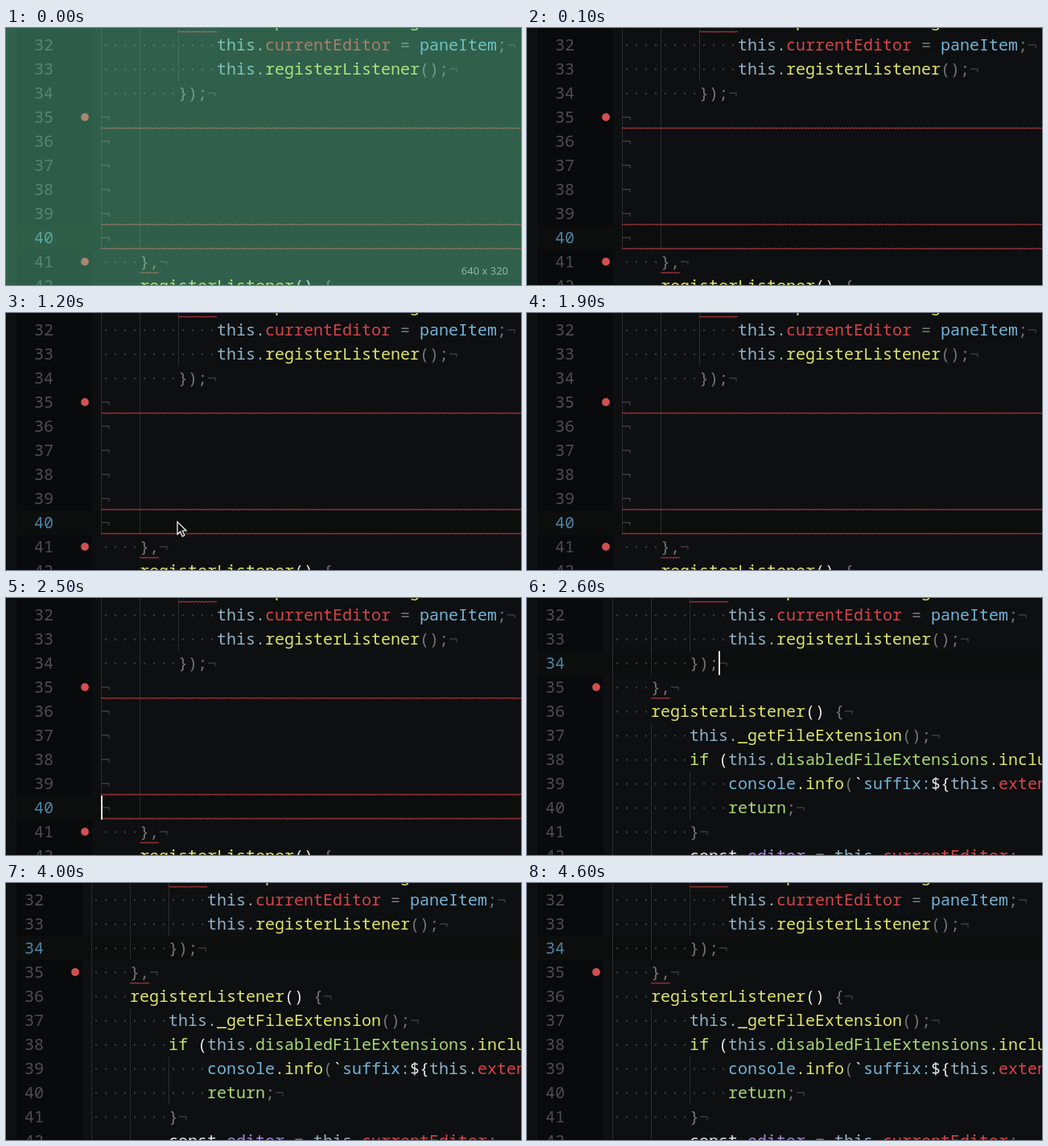
An HTML page with a canvas for the animation above (4.7 s loop, 640 px wide and 320 px high).

```html
<!DOCTYPE html>
<html lang="en">
<head>
<meta charset="utf-8">
<title>Code editor</title>
<style>
html, body { margin: 0; width: 100%; height: 100%; overflow: hidden; background: #0d0f10; }
canvas { display: block; width: 640px; height: 320px; }
</style>
</head>
<body>
<canvas id="stage" width="640" height="320"></canvas>
<script>
const ctx = document.getElementById('stage').getContext('2d');
const LOOP = 4700, SWITCH = 2600, CHAR = 12, ROW = 30, FIRST = 32;
const BLINK = 810;

const C = {
  bg: '#0d0f10', gutter: '#080a0b', edge: '#111314', active: '#0b0e0d',
  num: '#4b4f52', numOn: '#4f83a3', dot: '#3a3d3f', guide: '#2b2d2f', eol: '#3b3e40',
  b: '#8fb0c6', c: '#74b3d6', r: '#d6434a', y: '#e0e468', g: '#a9d877', l: '#c4e56e',
  k: '#727577', w: '#e4e7e2', p: '#a784d6', mark: '#d2504f', wave: '#a8343d'
};

// Each row: indent, then tokens as [colour key, text]; eol draws the line-end mark.
const row = (indent, tokens, eol = true) => ({ indent, tokens, eol });
const blank = row(0, []);
const head = {
  31: row(8, [['r', 'atom'], ['k', '.'], ['y', 'workspace'], ['k', '.'], ['y', 'onDidChangeActivePaneItem']], false),
  32: row(12, [['b', 'this.'], ['r', 'currentEditor'], ['k', ' = '], ['c', 'paneItem'], ['k', ';']]),
  33: row(12, [['b', 'this.'], ['y', 'registerListener'], ['k', '();']]),
  34: row(8, [['k', '});']])
};
const close = row(4, [['k', '},']]);
const method = row(4, [['y', 'registerListener'], ['w', '()'], ['k', ' {']]);

const before = {
  x: 118, current: 40, marks: [35, 41], caret: 118,
  rows: { ...head, 35: blank, 36: blank, 37: blank, 38: blank, 39: blank, 40: blank, 41: close, 42: method },
  waves: [[31, 8, 4], [35, 0, 44], [39, 0, 44], [40, 0, 44], [41, 4, 2]],
  guides: [[0, 0, 276], [4, 0, 276], [8, 0, 66]]
};
const after = {
  x: 106, current: 34, marks: [35], caret: 238,
  rows: {
    ...head, 35: close, 36: method,
    37: row(8, [['b', 'this.'], ['y', '_getFileExtension'], ['k', '();']]),
    38: row(8, [['l', 'if '], ['w', '('], ['b', 'this.'], ['g', 'disabledFileExtensions'], ['y', '.includes']], false),
    39: row(12, [['c', 'console'], ['y', '.info'], ['k', '('], ['w', '`'], ['c', 'suffix:'], ['w', '${'], ['b', 'this.'], ['r', 'extension']], false),
    40: row(12, [['g', 'return'], ['k', ';']]),
    41: row(8, [['k', '}']]),
    42: row(8, [['w', 'const '], ['p', 'editor'], ['k', ' = '], ['b', 'this.'], ['r', 'currentEditor'], ['k', ';']])
  },
  waves: [[31, 8, 4], [35, 4, 2]],
  guides: [[0, 0, 320], [4, 0, 96], [4, 156, 320], [8, 0, 66], [8, 216, 276]]
};

const base = n => 28 + (n - FIRST) * ROW;

function rect(color, x, y, w, h) {
  ctx.fillStyle = color;
  ctx.fillRect(x, y, w, h);
}

function disc(color, x, y, r) {
  ctx.fillStyle = color;
  ctx.beginPath();
  ctx.arc(x, y, r, 0, Math.PI * 2);
  ctx.fill();
}

function text(color, s, x, y) {
  ctx.fillStyle = color;
  ctx.fillText(s, x, y);
}

function line(color, width, points) {
  ctx.strokeStyle = color;
  ctx.lineWidth = width;
  ctx.beginPath();
  points.forEach(([x, y]) => ctx.lineTo(x, y));
  ctx.stroke();
}

function wave(x, y, w) {
  const points = [];
  for (let i = 0; i <= w; i += 2) points.push([x + i, y + (i % 4 ? -0.6 : 0.6)]);
  line(C.wave, 1.2, points);
}

function drawRow({ indent, tokens, eol }, x, y) {
  for (let i = 0; i < indent; i++) disc(C.dot, x + (i + 0.5) * CHAR, y - 6.5, 1.2);
  x += indent * CHAR;
  for (const [key, s] of tokens) {
    text(C[key], s, x, y);
    x += s.length * CHAR;
  }
  if (eol) line(C.eol, 1.3, [[x + 1, y - 7], [x + 10, y - 7], [x + 10, y - 3]]);
}

function drawEditor(v) {
  rect(C.bg, 0, 0, 640, 320);
  rect(C.gutter, 12, 0, v.x - 23, 320);
  rect(C.edge, 12, 0, 1, 320);
  rect(C.active, 13, base(v.current) - 22, 627, ROW);

  for (const [col, top, end] of v.guides) rect(C.guide, v.x + col * CHAR, top, 1, end - top);

  ctx.font = '500 20px "Noto Sans Mono", "DejaVu Sans Mono", monospace';
  for (const key in v.rows) {
    const n = +key, y = base(n);
    text(n === v.current ? C.numOn : C.num, key, v.x - 83, y);
    drawRow(v.rows[key], v.x, y);
  }
  for (const n of v.marks) disc(C.mark, v.x - 20, base(n) - 7, 4.9);
  for (const [n, col, len] of v.waves) wave(v.x + col * CHAR, base(n) + 6.7, len * CHAR);
}

function drawPointer(x, y) {
  const shape = [[0, 0], [0, 15.5], [3.6, 12.2], [6.2, 18.2], [8.8, 17], [6.3, 11.2], [11, 11]];
  ctx.beginPath();
  shape.forEach(([dx, dy]) => ctx.lineTo(x + dx, y + dy));
  ctx.closePath();
  ctx.fillStyle = '#08090a';
  ctx.fill();
  ctx.strokeStyle = '#f2f2f2';
  ctx.lineWidth = 1.3;
  ctx.stroke();
}

function caretOn(t) {
  return t < SWITCH
    ? (t - 100 + BLINK) % BLINK >= BLINK / 2
    : (t - 2570) % BLINK < BLINK / 2;
}

function draw(t) {
  const view = t < SWITCH ? before : after;
  drawEditor(view);
  if (t >= 100 && caretOn(t)) rect('#e0e2e1', view.caret, base(view.current) - 22, 2, ROW);
  if (t >= 700 && t < 1900) drawPointer(213, 260);
  if (t < 100) {
    rect('rgba(100, 218, 163, 0.4)', 0, 0, 640, 320);
    ctx.font = '13px "Open Sans", "Noto Sans", sans-serif';
    ctx.textAlign = 'right';
    text('#93bda9', '640 x 320', 624, 307);
    ctx.textAlign = 'left';
  }
}

const start = performance.now();
function tick() {
  draw((performance.now() - start) % LOOP);
  requestAnimationFrame(tick);
}
draw(0);
requestAnimationFrame(tick);
</script>
</body>
</html>
```
